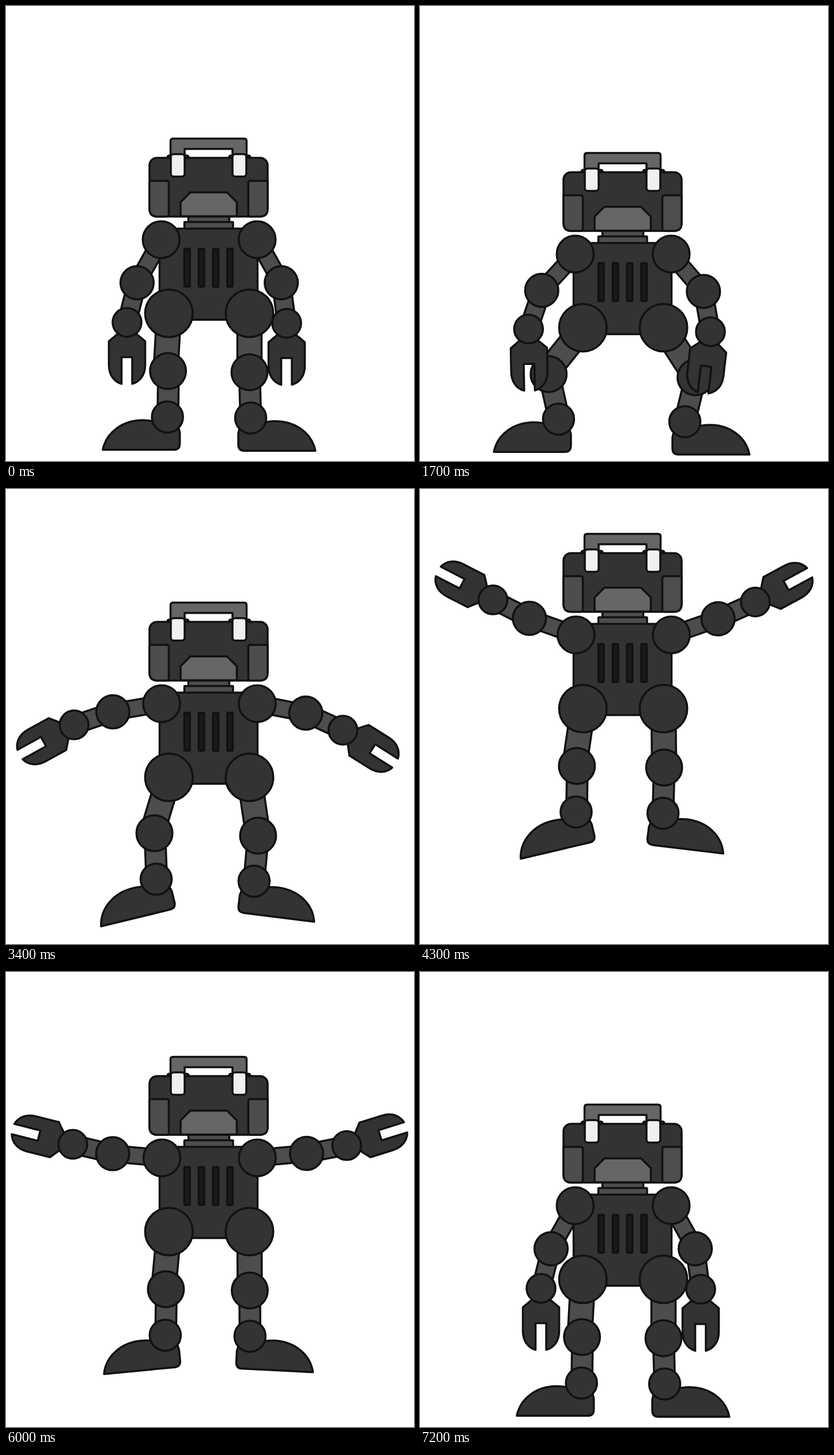
Write an HTML page that moves like this. It is 708x791 px and loops after 7300 ms.

```html
<!DOCTYPE html>
<html lang="en">
<head>
<meta charset="utf-8">
<title>Jumping robot</title>
<style>
html, body { margin: 0; width: 100%; height: 100%; overflow: hidden; background: #fff; }
svg { display: block; }
</style>
</head>
<body>
<svg id="stage" width="708" height="791" viewBox="0 0 708 791" stroke="#111" stroke-width="3.5" stroke-linejoin="round"></svg>
<script>
const STEP = 100, FRAMES = 73;
const DARK = '#333', MID = '#4d4d4d', LIGHT = '#666';
const stage = document.getElementById('stage');

function add(parent, tag, attrs) {
  const el = document.createElementNS('http://www.w3.org/2000/svg', tag);
  for (const k in attrs) el.setAttribute(k, attrs[k]);
  return parent.appendChild(el);
}
const rect = (p, x, y, width, height, rx, fill) => add(p, 'rect', { x, y, width, height, rx, fill });
const path = (p, d, fill) => add(p, 'path', { d, fill });
const disc = r => add(stage, 'circle', { r, fill: DARK });
const limb = (w, len, shift = 0) => rect(stage, shift - w / 2, 0, w, len, 0, MID);

// Keys: angles in degrees, measured outward from straight down.
const ARM = [0, 24, 52, 72], LEG = [0, 24, 36, 72];
const sides = [
  {
    s: -1, shoulder: [269.3, 269.3, 271.4, 269.3], hip: 282.7, thighLen: 100.3, shinLen: 80,
    thighTilt: 2.3, shinShift: 0.8,
    upper: [29.2, 48.1, 138.8, 29.2], fore: [14.2, 20.7, 162.5, 14.2], claw: [0, -1.5, 173.7, 0],
    thigh: [0.9, 51, 7.2, 0.9], shin: [0.7, -17.8, 1, 0.7], foot: [0, 0, 16.4, 0]
  },
  {
    s: 1, shoulder: [435.8, 435.8, 436.3, 435.8], hip: 422.5, thighLen: 102.5, shinLen: 79.4,
    thighTilt: 0, shinShift: 0,
    upper: [29.2, 45.5, 139.2, 29.2], fore: [7.6, 10.8, 163.4, 7.6], claw: [0, -9.5, 179, 0],
    thigh: [0, 46.3, 0.8, 0], shin: [1.5, -19.6, -2.1, 1.5], foot: [0, 0, 8.6, 0]
  }
];
const CROUCH = 35.3;
const JUMP = [[24, CROUCH], [32, -6], [34, -33], [40, -126], [43, -152.5], [47.5, -164.5],
  [51, -163], [56, -136.5], [60, -83], [64, -34.5], [67, -9], [70, 0], [72, 0]];

function track(times, vals, f) {
  let i = 0;
  while (i < times.length - 2 && f > times[i + 1]) i++;
  const u = (f - times[i]) / (times[i + 1] - times[i]);
  return vals[i] + (vals[i + 1] - vals[i]) * u;
}

function slope(i) {
  if (i === 0 || i === JUMP.length - 1) return 0;
  const a = JUMP[i - 1], b = JUMP[i + 1];
  return (b[1] - a[1]) / (b[0] - a[0]);
}

function height(f) {
  if (f <= 24) return CROUCH * f / 24;
  let i = 0;
  while (i < JUMP.length - 2 && f > JUMP[i + 1][0]) i++;
  const [t0, a] = JUMP[i], [t1, b] = JUMP[i + 1];
  const h = t1 - t0, u = (f - t0) / h, v = 1 - u;
  return a * v * v * (1 + 2 * u) + b * u * u * (3 - 2 * u)
    + h * u * v * (slope(i) * v - slope(i + 1) * u);
}

function buildTorso(g) {
  rect(g, 316.5, 360, 71, 20, 0, MID);
  rect(g, 309.5, 375.5, 84.5, 14, 1, MID);
  rect(g, 266.5, 387, 170, 158.5, 1, DARK);
  for (let i = 0; i < 4; i++) rect(g, 309.5 + i * 24.8, 422, 9.5, 66, 1.5, '#1a1a1a');
  path(g, 'M285.5 268V235Q285.5 230.5 290 230.5H413Q417.5 230.5 417.5 235V268H393V248.5H310V268Z', LIGHT);
  for (const x of [280, 387]) rect(g, x, 260, 37, 12, 3, DARK);
  rect(g, 249, 264, 205, 102, 13, DARK);
  path(g, 'M249 304H279Q282.5 304 282.5 308V362Q282.5 366 278 366H262Q249 366 249 353Z', MID);
  path(g, 'M454 304H424Q420.5 304 420.5 308V362Q420.5 366 425 366H441Q454 366 454 353Z', MID);
  path(g, 'M303 365.5V341L320 324H383.5L400.5 341V365.5Z', LIGHT);
  for (const x of [286, 393]) rect(g, x, 257.5, 24, 39, 5, '#f0f0f0');
}

const CLAW = 'M-16 20L-31.5 33V74C-31.5 91 -23 103 -9.5 107V60.5H9V107C23 103 31.5 91 31.5 74V33L16 20Z';
const FOOT = 'M-112.2 57C-106 25 -76 5.5 -43 5.5Q-30 5.5 -10 10L17 8L21.5 27V46Q21.5 57 11 57Z';

for (const p of sides) {
  p.upperEl = limb(28.5, 86);
  p.thighEl = limb(42, p.thighLen);
}
const torso = add(stage, 'g', {});
buildTorso(torso);
for (const p of sides) {
  p.shinEl = limb(36, p.shinLen, p.shinShift);
  p.footEl = path(stage, FOOT, DARK);
  p.hipEl = disc(41.3);
  p.kneeEl = disc(31.2);
  p.ankleEl = disc(27);
}
for (const p of sides) {
  p.foreEl = limb(31.5, 71);
  p.clawEl = path(stage, CLAW, DARK);
  p.shoulderEl = disc(32);
  p.elbowEl = disc(28.8);
  p.wristEl = disc(25);
}

function place(el, [x, y], turn = 0, flip = 1) {
  el.setAttribute('transform',
    `translate(${x.toFixed(2)} ${y.toFixed(2)}) rotate(${turn.toFixed(2)}) scale(${flip} 1)`);
}

function reach([x, y], s, deg, len) {
  const a = deg * Math.PI / 180;
  return [x + s * Math.sin(a) * len, y + Math.cos(a) * len];
}

function draw(f) {
  const y = height(f);
  place(torso, [0, y]);
  for (const p of sides) {
    const s = p.s;
    const arm = k => track(ARM, p[k], f), leg = k => track(LEG, p[k], f);
    const upper = arm('upper'), fore = arm('fore');
    const shoulder = [arm('shoulder'), 406.2 + y];
    const elbow = reach(shoulder, s, upper, 85.8);
    const wrist = reach(elbow, s, fore, 71);
    place(p.upperEl, shoulder, -s * upper);
    place(p.foreEl, elbow, -s * fore);
    place(p.clawEl, wrist, -s * arm('claw'));
    place(p.shoulderEl, shoulder);
    place(p.elbowEl, elbow);
    place(p.wristEl, wrist);

    const thigh = leg('thigh'), shin = leg('shin');
    const hip = [p.hip, 534.3 + y];
    const knee = reach(hip, s, thigh, p.thighLen);
    const ankle = reach(knee, s, shin, p.shinLen);
    place(p.thighEl, hip, -s * (thigh + p.thighTilt));
    place(p.shinEl, knee, -s * shin);
    place(p.footEl, ankle, s * leg('foot'), -s);
    place(p.hipEl, hip);
    place(p.kneeEl, knee);
    place(p.ankleEl, ankle);
  }
}

const start = performance.now();
function tick() {
  draw(Math.floor((performance.now() - start) / STEP) % FRAMES);
  requestAnimationFrame(tick);
}
tick();
</script>
</body>
</html>
```
